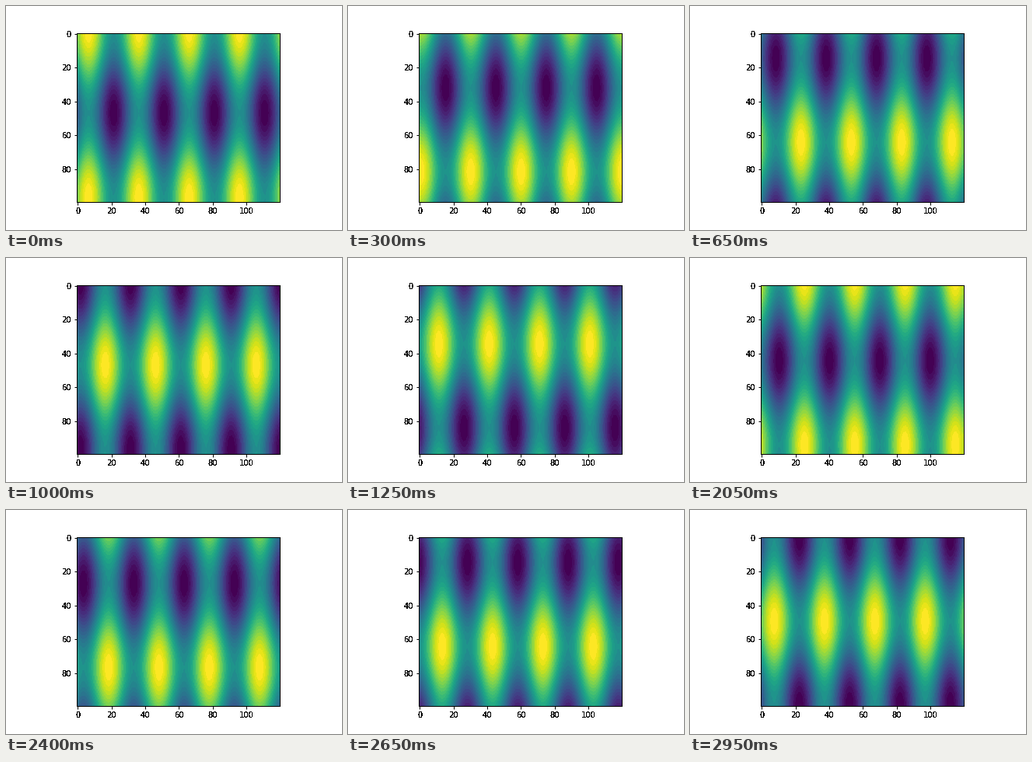
These frames come from a looping animation (432x288 px, 3 s). A matplotlib script:

```python
import numpy as np
import matplotlib.pyplot as plt
from matplotlib.animation import FuncAnimation

FRAMES = 60
INTERVAL = 50  # ms
STEP_X = np.pi / 15
STEP_Y = np.pi / 20

plt.rcParams.update({
    "font.family": "DejaVu Sans",
    "font.size": 10,
    "axes.linewidth": 1,
    "xtick.major.width": 1,
    "ytick.major.width": 1,
})

x = np.linspace(0, 8 * np.pi, 120)
y = np.linspace(0, 2 * np.pi, 100).reshape(-1, 1)


def wave(step):
    return np.sin(x + step * STEP_X) + np.cos(y + step * STEP_Y)


def harden(img, dpi):
    """Turn soft glyph edges into solid black pixels."""
    out = np.zeros_like(img)
    out[..., 3] = img[..., 3] > 0.25
    return out, 0, 0


fig, ax = plt.subplots(figsize=(6, 4), dpi=72, facecolor="white")
fig.subplots_adjust(left=0.125, right=0.9, bottom=0.125, top=0.88)

image = ax.imshow(wave(1), cmap=plt.get_cmap("viridis", 32), vmin=-2, vmax=2)
ax.set_xticks(range(0, 101, 20))
ax.set_yticks(range(0, 81, 20))
for label in ax.get_xticklabels() + ax.get_yticklabels():
    label.set_agg_filter(harden)


def update(frame):
    image.set_data(wave(frame + 1))
    return [image]


anim = FuncAnimation(fig, update, frames=FRAMES, interval=INTERVAL,
                     repeat=True, blit=False)
plt.show()
```
